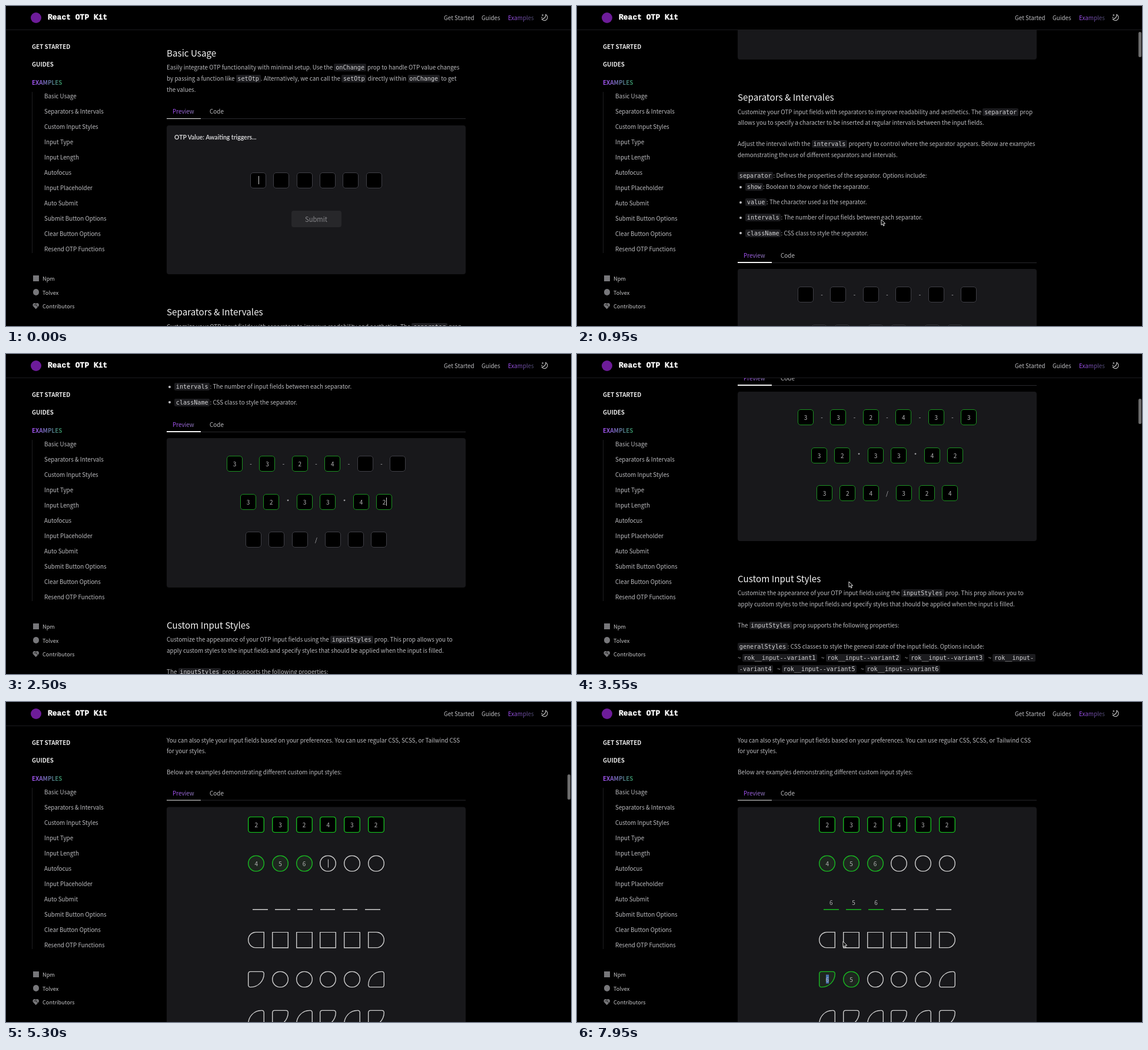
An HTML page for the animation above (8000 ms loop, 960 by 544 pixels).

```html
<!DOCTYPE html>
<html lang="en">
<head>
<meta charset="utf-8">
<title>React OTP Kit</title>
<style>
html, body { margin: 0; width: 100%; height: 100%; overflow: hidden; background: #000; }
body { position: relative; font: 300 9.87px "Noto Sans CJK JP", "Noto Sans CJK SC", "Noto Sans", sans-serif; color: #bdbdc0; }
div, svg { position: absolute; box-sizing: border-box; }
#view { left: 0; top: 41px; width: 960px; height: 503px; overflow: hidden; }
#page { left: 0; top: 0; }
.t { line-height: 20px; margin-top: -10px; white-space: pre; }
.c { transform: translateX(-50%); }
.h2 { font-size: 15.2px; font-weight: 400; color: #f6f6f6; }
.head { font-weight: 700; color: #ececec; }
.otp { font: bold 10.4px/20px Lato, sans-serif; color: #d0d0d2; }
.brand { font: bold 13px/20px "Liberation Mono", monospace; color: #fff; -webkit-text-stroke: .4px #fff; }
.fade { color: transparent; background: linear-gradient(90deg, #a44df5, var(--to)); -webkit-background-clip: text; background-clip: text; }
code { font: 400 10.15px/1 "DejaVu Sans Mono", monospace; color: #d4d4d6; background: #1c1c1f; border-radius: 2px; padding: 1px 2.8px; }
.panel { left: 273px; width: 508px; background: #18181b; border-radius: 4px; }
.cell { border: 1px solid #3f3f46; border-radius: 5px; background: #000; text-align: center; font-size: 10px; font-weight: 400; color: #b4b4b6; }
.cell.on { border-color: #1c8f22; }
.bold { --ink: #cfcfcf; border: 0; padding: 1px; background: none; box-shadow: inset 0 0 0 1.4px var(--ink); }
.bold.on { --ink: #18b921; }
.tint.on { background: #1e261f; }
.line { border-radius: 0; box-shadow: inset 0 -1.5px var(--ink); }
mark { color: inherit; background: #4a72b0; padding: 0; }
</style>
</head>
<body>
<div id="view"><div id="page"></div></div>
<div id="frame"></div>
<div id="thumb" style="left:954px;width:4.5px;height:43px;border-radius:3px;background:#6c6c6c"></div>
<svg id="pointer" width="20" height="26" viewBox="-6 -6 20 26" style="margin:-6px 0 0 -6px">
  <path id="arrow" d="M0 0V9.4L2.1 7.4 3.7 10.8 5.2 10.1 3.7 6.8H6.7Z" fill="#000" stroke="#fff" stroke-width=".9"/>
  <g id="beam" fill="none"><path d="M-2-5Q0-5 0-3V3Q0 5-2 5M2-5Q0-5 0-3M0 3Q0 5 2 5M-1.5 1.5H1.5" stroke="#fff" stroke-width="1.8"/><path d="M-2-5Q0-5 0-3V3Q0 5-2 5M2-5Q0-5 0-3M0 3Q0 5 2 5" stroke="#222" stroke-width=".6"/></g>
  <g id="ban" transform="translate(5.5 14)"><circle r="5.4" fill="#fff"/><path d="M-2.5-2.5L2.5 2.5M3.7 0A3.7 3.7 0 1 1-3.7 0A3.7 3.7 0 1 1 3.7 0" fill="none" stroke="#000" stroke-width="1.4"/></g>
</svg>
<script>
const $ = id => document.getElementById(id);
const page = $('page'), frame = $('frame');
const TOP = 41, LOOP = 8000, STEP = 50;

function add(parent, cls, style, html = '') {
  const el = document.createElement('div');
  el.className = cls;
  el.style.cssText = style;
  el.innerHTML = html;
  parent.append(el);
  return el;
}
const rich = s => s.replace(/`([^`]+)`/g, '<code>$1</code>');
const label = (parent, x, y, s, cls = '', style = '') =>
  add(parent, 't ' + cls, `left:${x}px;top:${y}px;${style}`, rich(s));
const rect = (parent, x, y, w, h, style) =>
  add(parent, '', `left:${x}px;top:${y}px;width:${w}px;height:${h}px;${style}`);

// page-relative helpers
const say = (x, y, s, cls, style) => label(page, x, y - TOP, s, cls, style);
function demo(y, h) {
  say(283, y, 'Preview', 'fade', '--to:#8d7ab8');
  say(346, y, 'Code');
  rect(page, 331, y + 12 - TOP, 450, 1, 'background:#29292d');
  rect(page, 273, y + 11.5 - TOP, 58, 1.5, 'background:#f2f2f2');
  add(page, 'panel', `top:${y + 23.5 - TOP}px;height:${h}px`);
}

// cells: each has a digit and the time it is typed
const rows = [];
const seq = (digits, start) => [...digits].map((d, i) => [d, start + STEP * i]);
function row(y, xs, typed = [], o = {}) {
  const size = o.size || 27;
  rows.push(xs.map((x, i) => {
    const el = add(page, 'cell ' + (o.cls || ''),
      `left:${x}px;top:${y - size / 2 - TOP}px;width:${o.w || size}px;height:${size}px;` +
      `line-height:${size - 2}px;` + (o.shape ? 'border-radius:' + o.shape(i) : ''));
    return { el, x: x + (o.w || size) / 2, y, digit: (typed[i] || [''])[0], at: typed[i] ? typed[i][1] : Infinity };
  }));
}
const spread = (x, step) => Array.from({ length: 6 }, (_, i) => x + step * i);
const marks = (y, s, xs) => xs.forEach(x => say(x, y, s, 'c'));

// section 1
say(273, 79, 'Basic Usage', 'h2');
say(273, 104, 'Easily integrate OTP functionality with minimal setup. Use the `onChange` prop to handle OTP value changes');
say(273, 123, 'by passing a function like `setOtp`. Alternatively, we can call the `setOtp` directly within `onChange` to get');
say(273, 141.5, 'the values.');
demo(179, 253.5);
say(286, 223, 'OTP Value: Awaiting triggers...', 'otp');
row(296, spread(415, 39.35));
rect(page, 485, 347.5 - TOP, 85, 28.5, 'background:#27272a;border-radius:4px');
say(527, 361.5, 'Submit', 'c', 'font-size:11.2px;font-weight:400;color:#86868a');

// section 2
say(273, 519, 'Separators &amp; Intervales', 'h2');
say(273, 544.5, 'Customize your OTP input fields with separators to improve readability and aesthetics. The `separator` prop');
say(273, 563, 'allows you to specify a character to be inserted at regular intervals between the input fields.');
say(273, 599, 'Adjust the interval with the `intervals` property to control where the separator appears. Below are examples');
say(273, 617.5, 'demonstrating the use of different separators and intervals.');
say(273, 653, '`separator`: Defines the properties of the separator. Options include:');
['`show`: Boolean to show or hide the separator.',
 '`value`: The character used as the separator.',
 '`intervals`: The number of input fields between each separator.',
 '`className`: CSS class to style the separator.'].forEach((s, i) => {
  const y = 672 + 26.2 * i;
  rect(page, 275.5, y - 1.5 - TOP, 4, 4, 'background:#bdbdc0;border-radius:50%');
  say(286, y, s);
});
demo(788.5, 253.5);
row(855, spread(375, 55.45), [...seq('3324', 1750), ...seq('33', 3300)]);
marks(855, '-', spread(416, 55.5).slice(0, 5));
row(920, [398, 437.4, 494, 533.4, 590, 629], seq('323342', 2250));
marks(920, '*', [479, 575]);
row(984.5, [407, 446.4, 485.8, 541.5, 581, 620.3], seq('324324', 2750));
marks(984.5, '/', [527]);

// section 3
say(273, 1129, 'Custom Input Styles', 'h2');
say(273, 1154, 'Customize the appearance of your OTP input fields using the `inputStyles` prop. This prop allows you to');
say(273, 1172.5, 'apply custom styles to the input fields and specify styles that should be applied when the input is filled.');
say(273, 1208.5, 'The `inputStyles` prop supports the following properties:');
say(273, 1244.5, '`generalStyles`: CSS classes to style the general state of the input fields. Options include:');
const options = (y, list) => say(273, y, list.map(s => `~ \`${s}\``).join('   '));
options(1263.5, ['rok__input--variant1', 'rok__input--variant2', 'rok__input--variant3', 'rok__input-']);
say(273, 1282.5, '`-variant4`   ~ `rok__input--variant5`   ~ `rok__input--variant6`');
say(273, 1318.5, '`onFilledStyles`: CSS classes to style the filled state of the input fields. Options include:');
options(1337.5, ['onfill__type1', 'onfill__type2', 'onfill__variant3', 'onfill__type3']);
say(273, 1373.5, 'You can also style your input fields based on your preferences. You can use regular CSS, SCSS, or Tailwind CSS');
say(273, 1391.5, 'for your styles.');
say(273, 1427.5, 'Below are examples demonstrating different custom input styles:');
demo(1464, 480);
const leaf = up => up ? '26px 5px 5px 5px' : '5px 5px 26px 5px';
const wide = spread(411.3, 40.65);
const styled = (y, typed, shape, cls = '') => row(y, wide, typed, { size: 28, cls: 'bold ' + cls, shape });
styled(1517.5, seq('232432', 4350), () => '5px;background:#000');
styled(1583.5, seq('456', 5150), () => '50%', 'tint');
row(1649, spread(419, 38.2), seq('656', 5450), { w: 25.5, cls: 'bold line' });
styled(1714, [], i => i == 0 ? '14px 0 0 14px' : i == 5 ? '0 14px 14px 0' : '0');
styled(1780.5, seq('65', 5900), i => i % 5 ? '50%' : leaf(i == 5), 'tint');
styled(1846.5, [], i => leaf(i % 2 == 0));
const caret = rect(page, 0, 0, 1, 14, 'background:#c8c8c8');

// fixed frame
rect(frame, 0, 0, 960, 41, 'background:#000;border-bottom:1px solid #1b1b1e');
rect(frame, 42, 10.5, 18, 18, 'background:#6d1c99;border-radius:50%');
label(frame, 71, 19.5, 'React OTP Kit', 'brand');
label(frame, 744, 20, 'Get Started');
label(frame, 808, 20, 'Guides');
label(frame, 853, 20, 'Examples', 'fade', '--to:#4b4a6a');
label(frame, 44, 68.5, 'GET STARTED', 'head');
label(frame, 44, 99, 'GUIDES', 'head');
label(frame, 44, 129.5, 'EXAMPLES', 'head fade', '--to:#2f8a5a');
rect(frame, 44, 146, 1, 274, 'background:#1e1e21');
['Basic Usage', 'Separators &amp; Intervals', 'Custom Input Styles', 'Input Type', 'Input Length', 'Autofocus',
 'Input Placeholder', 'Auto Submit', 'Submit Button Options', 'Clear Button Options', 'Resend OTP Functions']
  .forEach((s, i) => label(frame, 65, 153 + 26 * i, s));
['Npm', 'Tolvex', 'Contributors'].forEach((s, i) =>
  label(frame, 62, 463 + 23.5 * i, s, '', 'font-size:9.2px;font-weight:400;color:#c6c6c8'));
rect(frame, 46, 458, 10, 10, 'background:#77777a');
rect(frame, 45.5, 481, 10.5, 10.5, 'background:#77777a;border-radius:50%');
frame.insertAdjacentHTML('beforeend', `
  <svg width="960" height="544" style="left:0;top:0" fill="none">
    <path d="M50.7 515.2L46 510.3Q44.6 507.8 46.4 505.8Q48.6 504 50.7 506Q52.8 504 55 505.8Q56.8 507.8 55.4 510.3Z" fill="#77777a"/>
    <path d="M47.5 508.5L50 507.5L54 511.3M50.5 509L52.5 507.5" stroke="#000" stroke-width=".8"/>
    <path d="M917 14.6A5.3 5.3 0 1 1 910.3 22.3A7 7 0 0 0 917 14.6Z" stroke="#d0d0d0" stroke-width="1.1"/>
    <path d="M911.8 14V17M910.3 15.5H913.3M910.5 18.5V20.3M909.6 19.4H911.4" stroke="#d0d0d0" stroke-width=".8"/>
  </svg>`);

// motion
const scrollKeys = [[450, 0], [550, 50], [950, 365], [1100, 540], [1200, 625], [1350, 669], [3480, 669],
  [3550, 748], [3750, 1110], [3880, 1255], [4000, 1295.5], [5000, 1295.5], [5150, 1309.5]];
const barSpans = [[480, 1650], [3480, 4250], [5000, 5500]];
// time, x, y, pointer kind until the next key
const pointerKeys = [[0, 500, 300, ''], [450, 500, 330, 'arrow'], [950, 516.5, 362.5, 'arrow'], [1350, 516, 362, 'arrow'],
  [1600, 388, 190, 'beam'], [1720, 388, 190, ''], [1950, 388, 190, 'beam'], [2180, 411, 255, ''],
  [2560, 411, 255, 'beam'], [2700, 420, 318, ''], [3080, 420, 318, 'arrow'], [3250, 610, 190, ''],
  [3400, 610, 190, 'arrow'], [3550, 461.5, 387, 'arrow'], [3750, 455, 370, 'arrow'], [4000, 423, 232, 'beam'],
  [4300, 423, 232, ''], [5600, 431, 340, 'arrow'], [5800, 425, 470, ''], [6020, 425, 465, 'arrow'],
  [6200, 474, 405, 'arrow'], [6700, 474, 405, 'arrow'], [6850, 412, 403, 'arrow'], [7080, 628, 415, 'arrow'],
  [7300, 474, 444, 'arrow'], [7450, 474, 444, 'arrow'], [7950, 451.5, 407, 'arrow']];
// time, row, cell (none: no focus)
const focusKeys = [[0, 0, 0], [1600, 1, 0], [2150, 2, 0], [2700, 3, 0], [3200, 1, 4], [3430], [4200, 4, 0],
  [4750, 5, 0], [5400, 6, 0], [5800, 8, 0], [6050]];

function pick(keys, t) {
  let i = 0;
  while (i < keys.length - 1 && keys[i + 1][0] <= t) i++;
  const a = keys[i], b = keys[i + 1] || a;
  const k = b === a ? 0 : Math.min(1, Math.max(0, (t - a[0]) / (b[0] - a[0])));
  return { a, mix: n => a[n] + (b[n] - a[n]) * k };
}

function draw(now) {
  const t = Math.floor((now + 4) / STEP) * STEP % LOOP;
  const scroll = pick(scrollKeys, t).mix(1);
  page.style.transform = `translateY(${-scroll}px)`;

  $('thumb').style.top = 13.5 + scroll * .0836 + 'px';
  $('thumb').style.opacity = Math.max(...barSpans.map(([a, b]) =>
    t < a ? 0 : Math.max(0, Math.min(1, (b - t) / 150))));

  rows.flat().forEach(c => {
    const on = t >= c.at;
    c.el.classList.toggle('on', on);
    const html = !on ? '' : c === rows[8][0] && t >= 6050 ? `<mark>${c.digit}</mark>` : c.digit;
    if (c.html !== html) c.el.innerHTML = c.html = html;
  });

  const [, r, first] = pick(focusKeys, t).a;
  caret.hidden = r === undefined;
  if (r !== undefined) {
    let i = first;
    while (i < 5 && t >= rows[r][i].at) i++;
    const c = rows[r][i];
    caret.style.left = c.x + (t >= c.at ? 3 : 0) + 'px';
    caret.style.top = c.y - 7 - TOP + 'px';
  }

  const p = pick(pointerKeys, t), x = p.mix(1), y = p.mix(2), kind = p.a[3];
  $('pointer').style.left = x + 'px';
  $('pointer').style.top = y + 'px';
  $('arrow').style.display = kind === 'arrow' ? '' : 'none';
  $('beam').style.display = kind === 'beam' ? '' : 'none';
  const disabled = rows[7].some(c => Math.abs(c.x - x) < 13.8 && Math.abs(c.y - scroll - y) < 14);
  $('ban').style.display = kind === 'arrow' && disabled ? '' : 'none';
}

const start = performance.now();
function tick() {
  draw(performance.now() - start);
  requestAnimationFrame(tick);
}
tick();
</script>
</body>
</html>
```
